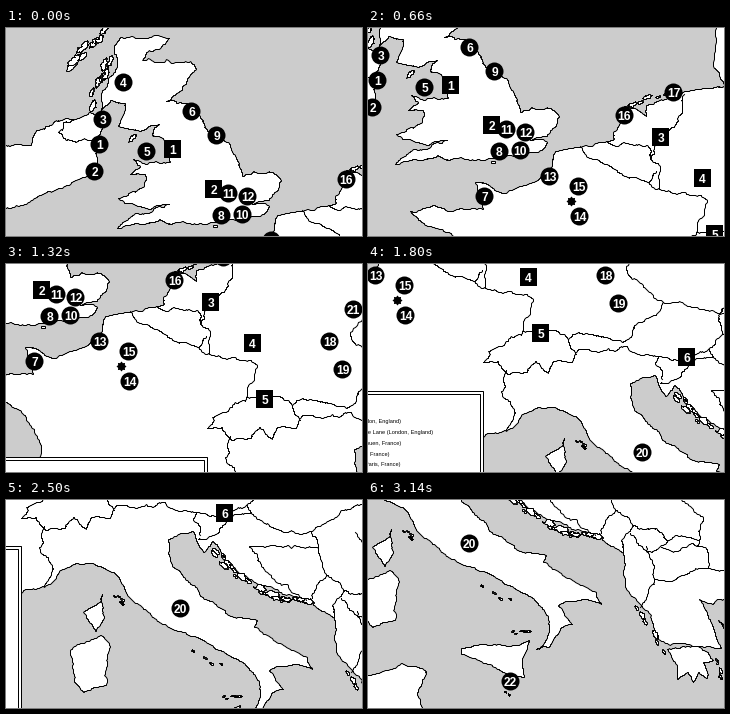
These frames come from a looping animation (356 by 208 pixels, 3300 ms). A matplotlib script:

```python
import numpy as np
import matplotlib.pyplot as plt
from matplotlib.animation import FuncAnimation
from matplotlib.patches import Circle, Rectangle

W, H, DPI = 356, 208, 100
PX = 72 / DPI
FRAMES, STEP_MS, HOLD = 165, 20, 4
SEA, LAND, INK = "#cccccc", "white", "black"

# Camera stops: step, left, top
STOPS = np.array([(0, 0, 0), (15, 45, 31), (43, 124, 96), (62, 172, 135),
                  (86, 258, 201), (121, 358, 281), (153, 431, 346)])
ISLES, _, NORTH, CENTRE, ALPS, ADRIA, SOUTH = STOPS[:, 1:]

rng = np.random.default_rng(11)

fig = plt.figure(figsize=(W / DPI, H / DPI), dpi=DPI, facecolor=SEA)
ax = fig.add_axes([0, 0, 1, 1])
ax.set_axis_off()


def fractal(pts, rough):
    """Midpoint displacement between key points, snapped to pixel centres."""
    for _ in range(5):
        a, b = pts[:-1], pts[1:]
        d = b - a
        size = np.hypot(*d.T)[:, None] + 1e-9
        normal = d[:, ::-1] * (1, -1) / size
        shift = rng.normal(0, rough, size.shape) * np.minimum(size, 25)
        out = np.empty((len(pts) * 2 - 1, 2))
        out[::2] = pts
        out[1::2] = (a + b) / 2 + normal * shift
        pts = out
    pts = np.round(pts)
    moved = np.r_[True, np.any(np.diff(pts, axis=0) != 0, axis=1)]
    return pts[moved] + 0.5


def land(*parts, rough=0.07):
    pts = np.vstack([np.add(p, origin) for origin, p in parts]).astype(float)
    pts = fractal(np.vstack([pts, pts[:1]]), rough)
    ax.fill(*pts.T, fc=LAND, ec=INK, lw=PX, zorder=1)


def border(origin, *pts):
    line = fractal(np.add(pts, origin).astype(float), 0.1)
    ax.plot(*line.T, color=INK, lw=PX, zorder=2)


def isles(origin, a, b, count, size, spread=2):
    """A chain of small islands scattered along the line from a to b."""
    a, b = np.array(a, float), np.array(b, float)
    along = (b - a) / np.hypot(*(b - a))
    across = along[::-1] * (-1, 1)
    turn = np.linspace(0, 2 * np.pi, 7)[:-1, None]
    for t in (np.arange(count) + 0.5) / count:
        centre = a + (b - a) * t + rng.normal(0, spread, 2)
        r = size * rng.uniform(0.6, 1.3)
        blob = centre + r * (along * np.cos(turn) + 0.4 * across * np.sin(turn))
        land((origin, blob), rough=0.15)


# Great Britain and Ireland
land((ISLES, [
    (108, 17), (111, 36), (102, 50), (97, 62), (95, 82), (104, 72), (119, 75),
    (112, 98), (134, 103), (153, 96), (146, 107), (159, 113), (164, 134),
    (127, 131), (134, 138), (124, 146), (139, 146), (138, 158), (112, 170),
    (140, 180), (163, 176), (138, 185), (111, 200), (138, 196), (153, 191),
    (172, 194), (209, 194), (254, 188), (263, 178), (246, 176), (263, 171),
    (271, 163), (275, 152), (268, 145), (247, 143), (236, 148), (232, 134),
    (222, 114), (201, 102), (193, 87), (181, 75), (160, 73), (176, 62),
    (190, 41), (184, 33), (136, 32), (140, 24), (163, 10), (114, 9)]), rough=0.09)
land((ISLES, [
    (-8, 117), (25, 117), (30, 102), (48, 93), (76, 88), (92, 87), (97, 98),
    (88, 112), (90, 124), (89, 147), (56, 160), (28, 170), (-8, 183)]), rough=0.09)
border(ISLES, (67, 91), (52, 104), (64, 112), (87, 112))
isles(ISLES, (60, 40), (100, 0), 7, 7)
isles(ISLES, (82, 74), (100, 26), 8, 6, 4)
isles(ISLES, (122, 114), (130, 106), 1, 5, 0)
isles(ISLES, (203, 197), (213, 197), 1, 4, 0)

# The mainland, from Jutland round to the Aegean
north_sea = [
    (310, -60), (306, 8), (317, 27), (302, 28), (276, 31), (262, 37), (238, 45),
    (238, 56), (222, 48), (216, 46), (205, 72), (206, 79), (190, 82), (147, 91)]
atlantic = [
    (144, 105), (130, 120), (97, 133), (80, 124), (67, 122), (75, 149), (44, 151),
    (25, 145), (2, 151), (16, 164), (48, 177), (67, 191), (83, 228), (85, 330),
    (220, 330)]
tyrrhenian = [
    (14, 93), (44, 84), (68, 64), (92, 66), (112, 76), (124, 98), (161, 126),
    (188, 136), (206, 145), (219, 153), (238, 163), (249, 175), (254, 192),
    (250, 206)]
boot = [
    (168, 149), (181, 147), (192, 129), (204, 124), (190, 105), (198, 101),
    (217, 99), (233, 104), (228, 92), (175, 62), (178, 55), (149, 50), (128, 35),
    (106, 13)]
adriatic = [
    (166, 66), (162, 39), (187, 31), (191, 42), (198, 52), (206, 41), (216, 58),
    (250, 83), (303, 103), (328, 118)]
aegean = [
    (256, 60), (257, 87), (283, 118), (290, 139), (340, 146), (353, 148),
    (344, 124), (331, 99), (345, 104), (349, 99), (370, 98), (370, -346)]
land((NORTH, north_sea), (NORTH, atlantic), (ADRIA, tyrrhenian), (SOUTH, boot),
     (ADRIA, adriatic), (SOUTH, aegean), rough=0.06)

# Corsica, Sardinia, Sicily, Peloponnese, Euboea, Tunisia
land((ADRIA, [(96, 94), (98, 118), (90, 131), (77, 112), (94, 102)]))
land((ADRIA, [(95, 135), (104, 147), (100, 185), (77, 192), (68, 181), (64, 150)]))
land((SOUTH, [(93, 148), (112, 144), (140, 146), (161, 140), (154, 158),
              (156, 177), (130, 169), (93, 154)]), rough=0.05)
land((SOUTH, [(299, 149), (332, 147), (345, 160), (335, 162), (339, 178),
              (330, 172), (325, 182), (319, 172), (309, 179)]))
land((SOUTH, [(350, 120), (370, 138), (370, 143), (358, 134)]))
land((SOUTH, [(-6, 176), (33, 163), (58, 171), (49, 193), (66, 225), (-6, 225)]))

# Island chains: Frisia, Dalmatia, Tuscany, Pontine, Aeolian, Ionian, Malta
isles(NORTH, (218, 44), (262, 31), 5, 4, 0.5)
isles(ADRIA, (204, 48), (242, 83), 10, 5)
isles(ADRIA, (250, 90), (306, 104), 9, 6)
isles(ADRIA, (103, 92), (122, 104), 5, 2)
isles(ADRIA, (184, 149), (217, 167), 4, 2)
isles(SOUTH, (140, 131), (164, 130), 5, 2)
isles(SOUTH, (266, 104), (296, 157), 6, 4)
isles(SOUTH, (348, 160), (356, 182), 3, 3)
isles(SOUTH, (134, 190), (142, 196), 2, 2, 0)

# Low Countries, France, Germany
border(CENTRE, (124, 47), (143, 62), (164, 74), (192, 83), (221, 95), (251, 101),
       (240, 135))
border(CENTRE, (150, 42), (160, 47), (191, 46), (194, 59), (202, 64), (203, 89))
border(CENTRE, (200, 72), (192, 83))
border(CENTRE, (228, -5), (226, 12), (213, 30), (198, 47), (194, 59))

# Alpine countries and Bohemia
border(ALPS, (154, 67), (184, 66), (200, 75), (222, 70), (242, 75), (264, 71),
       (266, 61), (295, 38))
border(ALPS, (154, 69), (131, 82), (115, 98), (130, 97), (140, 110), (159, 108),
       (168, 97), (180, 109), (185, 97), (204, 98), (207, 88), (200, 75))
border(ALPS, (138, 106), (133, 128), (147, 149), (138, 166))
border(ALPS, (207, 88), (233, 87), (259, 82), (290, 92), (308, 96), (340, 85),
       (353, 62), (350, 51), (360, 42))
border(ALPS, (325, -40), (258, 2), (263, 14), (295, 38), (340, 46), (385, 50),
       (420, 46))
border(ALPS, (290, 92), (287, 100), (294, 115))
border(ALPS, (292, 119), (312, 113), (317, 105), (345, 93), (340, 85))

# Balkans
border(ADRIA, (245, 13), (270, 29), (305, 31), (335, 10), (366, 4))
border(ADRIA, (305, 31), (312, 48), (276, 47), (243, 46), (257, 68), (300, 100))
border(ADRIA, (312, 48), (321, 75), (306, 98))
border(ADRIA, (321, 75), (339, 90), (326, 106), (328, 117))
border(SOUTH, (266, 25), (288, 28), (300, 40), (283, 52), (262, 33))
border(SOUTH, (278, 46), (285, 75), (272, 107))
border(SOUTH, (293, 47), (325, 43), (338, 48), (340, 68), (309, 77), (287, 79))
border(SOUTH, (340, 68), (370, 70))
border(SOUTH, (330, 45), (335, 17), (300, -8), (276, -33))
border(SOUTH, (300, 40), (330, 40))

# Legend panel with a double frame
for x, y in ((372, 327), (369, 330)):
    ax.add_patch(Rectangle((-60, y + 0.5), x + 60.5, 400, fc=LAND, ec=INK,
                           lw=PX, zorder=3))
legend = [
    (291, "Harbour Lights (London, England)"),
    (323, "The Little Blue Lane (London, England)"),
    (291, "Green Door (Rouen, France)"),
    (280, "North Room (Paris, France)"),
    (291, "Paper Garden (Paris, France)"),
]
for row, (x, line) in enumerate(legend):
    ax.text(x, 359 + 10.7 * row, line, ha="right", va="center", fontsize=5.6 * PX,
            family="Liberation Sans", color=INK, zorder=4, clip_on=True)

# Numbered stops
rounds = [
    (93, 116), (88, 143), (96, 91), (117, 54), (140, 123), (185, 83), (200, 232),
    (215, 187), (210, 107), (236, 186), (222, 165), (241, 168), (265, 212),
    (295, 252), (294, 222), (340, 151), (389, 128), (495, 212), (508, 240),
    (532, 389), (519, 180), (573, 527)]
squares = [(166, 121), (207, 161), (376, 173), (418, 214), (430, 270), (576, 294)]


def stop(n, x, y, shape):
    shape.set(fc=INK, lw=0, zorder=5)
    ax.add_patch(shape)
    ax.text(x + 0.5, y + 0.8, str(n), color="white", ha="center",
            va="center_baseline", fontsize=12 * PX, weight="bold",
            family="Liberation Sans", zorder=6, clip_on=True)


for n, (x, y) in enumerate(rounds, 1):
    stop(n, x, y, Circle((x + 0.5, y + 0.5), 9))
for n, (x, y) in enumerate(squares, 1):
    stop(n, x, y, Rectangle((x - 8, y - 9), 17, 18))

angle = np.arange(16) * np.pi / 8
reach = np.where(np.arange(16) % 2, 3.6, 5)
ax.fill(287.5 + reach * np.cos(angle), 237.5 + reach * np.sin(angle),
        fc=INK, lw=0, zorder=5)


def update(i):
    step, left, top = STOPS.T
    n = np.clip(i - HOLD, 0, step[-1])
    x, y = (round(float(np.interp(n, step, v))) for v in (left, top))
    ax.set_xlim(x, x + W)
    ax.set_ylim(y + H, y)
    return []


update(0)
anim = FuncAnimation(fig, update, frames=FRAMES, interval=STEP_MS,
                     repeat=True, repeat_delay=0, blit=False)
plt.show()
```
